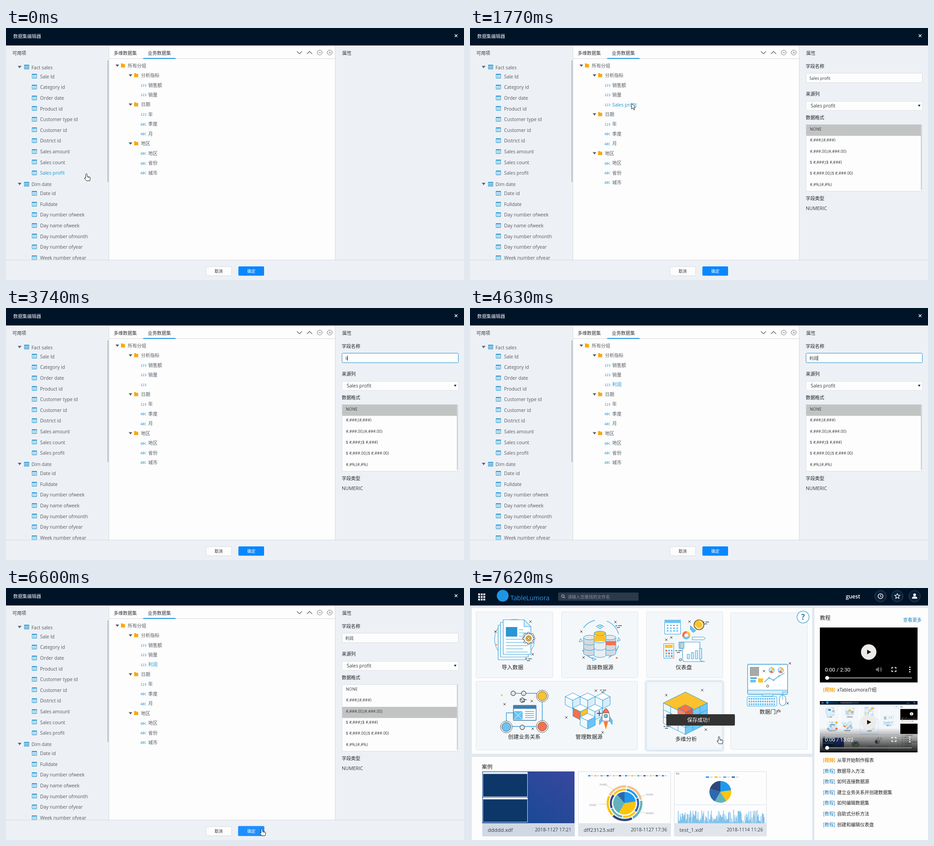
Animation of 1008x555 px, one loop 8160 ms. Source, as an HTML page with a canvas:

```html
<!DOCTYPE html>
<html lang="zh-CN">
<head>
<meta charset="utf-8">
<title>数据集编辑器</title>
<style>
html,body{margin:0;width:100%;height:100%;overflow:hidden;background:#edf1f5}
canvas{display:block}
</style>
</head>
<body>
<canvas id="stage" width="1008" height="555"></canvas>
<script>
const c = document.getElementById('stage').getContext('2d');
const LOOP = 8160, TAU = Math.PI * 2;
const NAVY = '#001428', BLUE = '#1f93d0', LINE = '#2f9fd6', GRAY = '#585c62', INK = '#1d2024', PALE = '#d9edf9',
  YELLOW = '#fcc22d', RED = '#f9704a', SKY = '#6cc3f5';
const UI = '"Open Sans","Noto Sans CJK SC","Noto Sans CJK JP",sans-serif';

// Drawing helpers
function paint(fill, stroke, lw = 1) {
  if (fill) { c.fillStyle = fill; c.fill(); }
  if (stroke) { c.strokeStyle = stroke; c.lineWidth = lw; c.stroke(); }
}
function box(x, y, w, h, fill, stroke, r = 0, lw = 1) {
  c.beginPath();
  c.roundRect(x, y, w, h, r);
  paint(fill, stroke, lw);
}
function disc(x, y, r, fill, stroke, lw) {
  c.beginPath();
  c.arc(x, y, r, 0, TAU);
  paint(fill, stroke, lw);
}
function arc(x, y, r, a, b, stroke, lw) {
  c.beginPath();
  c.arc(x, y, r, a, b);
  paint(null, stroke, lw);
}
function slice(x, y, r, a, b, fill) {
  c.beginPath();
  c.moveTo(x, y);
  c.arc(x, y, r, a, b);
  paint(fill);
}
function path(p, fill, stroke, lw) {
  c.beginPath();
  for (let i = 0; i < p.length; i += 2) c.lineTo(p[i], p[i + 1]);
  if (fill) c.closePath();
  paint(fill, stroke, lw);
}
function shape(d, x, y, fill, stroke, lw = 1) {
  const p = new Path2D(d);
  c.save();
  c.translate(x, y);
  if (fill) { c.fillStyle = fill; c.fill(p); }
  if (stroke) { c.strokeStyle = stroke; c.lineWidth = lw; c.stroke(p); }
  c.restore();
}
// y is the middle of the capitals
function text(s, x, y, color = GRAY, size = 10.4, align = 'left', weight = 400, font = UI) {
  c.font = `${weight} ${size}px ${font}`;
  c.fillStyle = color;
  c.textAlign = align;
  c.fillText(s, x, Math.round(y + size * .36));
}
function width(s, size) {
  c.font = `400 ${size}px ${UI}`;
  return c.measureText(s).width;
}

// Editor
const FACT = ['Sale Id', 'Category id', 'Order date', 'Product id', 'Customer type id', 'Customer id',
  'District id', 'Sales amount', 'Sales count', 'Sales profit'];
const DATES = ['Date id', 'Fulldate', 'Day number ofweek', 'Day name ofweek', 'Day number ofmonth',
  'Day number ofyear', 'Week number ofyear'];
const TREE = [['g', '所有分组'], ['f', '分析指标'], ['123', '销售额'], ['123', '销量'], ['f', '日期'],
  ['123', '年'], ['ABC', '季度'], ['ABC', '月'], ['f', '地区'], ['ABC', '地区'], ['ABC', '省份'], ['ABC', '城市']];
const FORMATS = ['NONE', '#,###;(#,###)', '#,###.00;(#,###.00)', '$ #,###;($ #,###)',
  '$ #,###.00;($ #,###.00)', '#,#%;(#,#%)'];
const T = { lift: 350, hover: 760, drop: 1160, pick: 1570, focus: 2400, erase: 2930, empty: 3060,
  type: 3610, commit: 4150, format: 5240, confirm: 6800, home: 7480 };

const caret = (x, y) => path([x - 4, y - 2.5, x + 4, y - 2.5, x, y + 2.5], '#565b61');

function columnIcon(x, y) {
  box(x + .5, y - 4.5, 10, 9, '#eaf4fb', BLUE);
  box(x, y - 5, 11, 2, BLUE);
  path([x + 3.8, y - 4, x + 3.8, y + 5], null, BLUE, .9);
  path([x + 7.2, y - 4, x + 7.2, y + 5], null, BLUE, .9);
}
function tableIcon(x, y) {
  columnIcon(x, y);
  path([x, y - .5, x + 11, y - .5], null, BLUE, .9);
  path([x, y + 2.2, x + 11, y + 2.2], null, BLUE, .9);
}
function source(title, y, rows, first, lit) {
  caret(30, y - 1);
  tableIcon(40, Math.round(y - .8));
  text(title, 56, y);
  rows.forEach((s, i) => {
    const ry = first + i * 23.6;
    columnIcon(57, Math.round(ry - .6));
    text(s, 75, ry, lit && s === 'Sales profit' ? BLUE : GRAY);
  });
}
function tree(t, label) {
  const rows = TREE.slice();
  if (t >= T.drop) rows.splice(4, 0, ['123', label, t >= T.pick]);
  const over = t >= T.hover && t < T.drop;
  rows.forEach(([kind, name, picked], i) => {
    const y = 83 + i * 21.45 + (over && i > 1 ? 1.5 : 0);
    if (over && i === 1) {
      box(255.5, 91.5, 468, 22, '#bfdff8');
      c.setLineDash([2, 1.5]);
      box(255.5, 91.5, 468, 22, null, '#2583c4');
      c.setLineDash([]);
    }
    if (kind === 'g' || kind === 'f') {
      const x = kind === 'g' ? 245 : 274;
      caret(x, y);
      shape('M0 0H4L5 1.5H9V9H0Z', x + 8, y - 5, '#f6ab13');
      text(name, x + 23, y, GRAY, 10.2);
    } else {
      text(kind, 296, y + .5, BLUE, 7.2, 'left', 400, '"DejaVu Sans Mono",monospace');
      text(name, 313, y, picked ? BLUE : GRAY, /[a-z]/.test(name) ? 10.4 : 10.2);
    }
  });
}
function nameAt(t) {
  if (t < T.erase) return 'Sales profit';
  if (t < T.empty) return 'Sales';
  if (t < T.type) return '';
  if (t < T.commit) return 'lirun'.slice(0, 1 + Math.floor((t - T.type) / 108));
  return '利润';
}
const caption = (s, y) => text(s, 739, y, INK, 10.2, 'left', 500);

function properties(t, name) {
  caption('字段名称', 84.8);
  const focus = t >= T.focus && t < T.format;
  box(739.5, 99.5, 256, 21, '#fdfdfd', focus ? '#2590cf' : '#d6dade', 2);
  text(name, 747, 110.5, '#33373c', 8.9);
  if (focus) box(747 + Math.round(width(name, 8.9)), 105, 1, 11, '#222');
  caption('来源列', 145.3);
  box(739.5, 161.5, 256, 20, '#fdfdfd', '#dce0e4', 2);
  text('Sales profit', 750, 171.5, '#383c41');
  path([986, 169, 991.4, 169, 988.7, 173.5], '#222');
  caption('数据格式', 197.5);
  box(739.5, 212.5, 255, 147, '#fdfdfd', '#dadee2');
  box(992, 213, 3, 143, '#d3d7da');
  box(740, 213 + (t < T.format ? 0 : 2) * 24.4, 252.5, 24.4, '#c2c3c3');
  FORMATS.forEach((s, i) => text(s, 748, 223 + i * 24.35, '#383c41', i ? 8.6 : 9.1));
  caption('字段类型', 375.8);
  text('NUMERIC', 739, 397.5, '#383c41');
}
function editor(t, p) {
  box(0, 0, 1008, 555, '#edf1f5');
  box(226, 38.4, 499, 472.6, '#d5dadf');
  box(227, 38.4, 497, 472.6, '#fdfdfd');
  box(0, 0, 1008, 38.4, NAVY);
  text('数据集编辑器', 16, 18.5, '#eef2f6', 10.2);
  path([987.5, 14, 993.5, 20], null, '#fff', 1.3);
  path([993.5, 14, 987.5, 20], null, '#fff', 1.3);
  text('可用项', 14, 55, '#33373c', 10.2);
  text('属性', 740, 55, '#33373c', 10.2);
  box(227, 67, 497, 1, '#d3d7db');
  text('多维数据集', 237, 55, '#33373c', 10.2);
  text('业务数据集', 312, 55, '#33373c', 10.2);
  box(302, 66, 71, 2, '#2496e0');
  path([640.5, 51.5, 646, 57, 651.5, 51.5], null, '#555', 1.2);
  path([662.5, 57, 668, 51.5, 673.5, 57], null, '#555', 1.2);
  disc(690.5, 54, 5.4, null, '#6a6e73');
  path([688, 54, 693, 54], null, '#6a6e73');
  disc(712.5, 54, 5.4, null, '#6a6e73');
  path([710.5, 52, 714.5, 56], null, '#6a6e73');
  path([714.5, 52, 710.5, 56], null, '#6a6e73');

  source('Fact sales', 87, FACT, 107, t < T.drop);
  source('Dim date', 344.5, DATES, 364.5);
  box(223, 71, 3, 268, '#c2c7cc', null, 1.5);

  const typed = nameAt(t);
  tree(t, t >= T.type && t < T.commit ? '' : typed);
  if (t >= T.pick) properties(t, typed);

  box(0, 511, 1008, 44, '#edf1f5');
  box(0, 510.5, 1008, 1, '#d5d9de');
  box(440.5, 525.5, 56, 20, '#fdfdfd', '#d8dbdf', 2);
  text('取消', 468, 535.5, '#33373c', 9, 'center');
  const hot = t > 6500 && t < 6900;
  if (hot) box(510.8, 524.2, 57.8, 22, '#1d90ff', null, 2);
  else box(511.5, 525, 56.5, 20.5, '#0987ff', null, 2);
  text('确定', 540, 535.5, '#fff', 9, 'center', 500);

  if (t >= T.lift && t < T.drop) {
    const dx = p.x - 115, dy = p.y - 318;
    c.globalAlpha = .55;
    box(26 + dx, 305 + dy, 197, 23, '#e8eef4');
    c.globalAlpha = .8;
    columnIcon(57 + dx, 318 + dy);
    text('Sales profit', 75 + dx, 319 + dy, BLUE);
    c.globalAlpha = 1;
  }
}
function loading(t) {
  c.globalAlpha = Math.min(1, (t - T.confirm) / 210);
  box(0, 0, 1008, 555, 'rgba(0,30,52,.5)');
  c.globalAlpha = 1;
  const shown = Math.floor((t - 6900) / 65) + 1;
  let n = 0;
  for (let row = 0; row < 5; row++) {
    const count = 3 - Math.abs(row - 2);
    for (let i = 0; i < count && n < shown; i++, n++) {
      const x = 504 + (i - (count - 1) / 2) * 13.4, y = 264.7 + row * 6.7;
      path([x, y - 5.8, x + 5.8, y, x, y + 5.8, x - 5.8, y], '#fff');
    }
  }
}

// Home page illustrations
function marks(...p) {
  for (let i = 0; i < p.length; i += 2) {
    const x = p[i], y = p[i + 1];
    path([x - 2.5, y - 2.5, x + 2.5, y + 2.5], null, '#333');
    path([x + 2.5, y - 2.5, x - 2.5, y + 2.5], null, '#333');
  }
}
function dashes(x, y) {
  path([x, y, x + 4, y], null, '#333', 1.3);
  path([x + 6, y, x + 14, y], null, '#333', 1.3);
  path([x + 3, y + 4, x + 10, y + 4], null, '#333', 1.3);
}
function cube(x, y, w, h, top, left, right) {
  const k = w / 2;
  path([x, y, x + w, y + k, x, y + w, x - w, y + k], top, LINE);
  path([x - w, y + k, x, y + w, x, y + w + h, x - w, y + k + h], left, LINE);
  path([x + w, y + k, x, y + w, x, y + w + h, x + w, y + k + h], right, LINE);
}
function drum(x, y, h, top, body) {
  c.beginPath();
  c.ellipse(x, y + h, 13, 5, 0, 0, Math.PI);
  c.lineTo(x - 13, y);
  c.lineTo(x + 13, y);
  c.closePath();
  paint(body, LINE);
  for (let i = 1; i < 3; i++) {
    c.beginPath();
    c.ellipse(x, y + h * i / 3, 13, 5, 0, 0, Math.PI);
    paint(null, LINE);
  }
  c.beginPath();
  c.ellipse(x, y, 13, 5, 0, 0, TAU);
  paint(top, LINE);
}
function documents() {
  arc(98, 113, 44, 2, 5.5, LINE);
  arc(98, 113, 44, -.2, 1.1, LINE);
  [62, 67, 73].forEach((x, i) =>
    shape('M0 0H46L61 15V76H0Z', x, 82 - i * 6, '#fff', LINE, 1.2));
  path([119, 70, 119, 85, 134, 85], PALE, LINE);
  box(79, 86, 25, 21, '#2c95d6');
  for (let i = 0; i < 8; i++) path([i < 3 ? 108 : 79, 92 + i * 7, i % 3 ? 127 : 117, 92 + i * 7], null, LINE);
  for (let i = 0; i < 8; i++) {
    const a = i * TAU / 8;
    disc(129 + 11 * Math.cos(a), 111 + 11 * Math.sin(a), 2.8, '#fff', '#444');
  }
  disc(129, 111, 10.5, '#fff', '#444');
  disc(129, 111, 6, YELLOW, '#444');
  disc(129, 111, 2.5, '#fff', '#444');
  marks(133, 74, 56, 96, 138, 146);
  dashes(122, 156);
  disc(58, 125, 1.5, RED);
}
function databases() {
  [[-2.5, -1.8], [-1.2, -.3], [.3, 1.1], [1.8, 2.6]].forEach(([a, b]) => arc(285, 114, 44, a, b, LINE, 1.3));
  path([327, 109, 331, 115, 324, 118], PALE, LINE);
  path([240, 119, 243, 111, 248, 117], PALE, LINE);
  path([270, 153, 278, 157, 270, 160], PALE, LINE);
  for (let i = 1; i < 4; i++) arc(286, 92, i * 3.5, -2.5, -.65, LINE, 1.3);
  drum(263, 109, 35, '#e6e9ed', '#d3dae1');
  drum(308, 109, 35, '#e6e9ed', '#d3dae1');
  box(295, 117, 26, 9, RED);
  drum(286, 100, 48, YELLOW, '#e9eef2');
  box(273.5, 105, 25, 12, YELLOW);
  marks(320, 75, 245, 96, 250, 153);
  dashes(320, 83);
  disc(323, 154, 2, RED);
}
function dashboard() {
  box(428.5, 70.5, 35, 31, '#fff', LINE);
  box(428, 70, 36, 7, SKY);
  for (let i = 0; i < 12; i++) box(433 + i % 4 * 7, 81 + (i >> 2) * 6, 4, 3, SKY);
  disc(504, 81, 11, YELLOW, '#444', 1.2);
  arc(504, 81, 8, -1.5, 3, '#fff', 1.5);
  slice(476, 104, 9, -1.5, .5, YELLOW);
  slice(476, 104, 9, .5, 2.6, SKY);
  slice(476, 104, 9, 2.6, 4.8, RED);
  disc(476, 104, 4, '#f4f7fa');
  path([485, 83, 497, 94, 491, 98, 485, 91], SKY, LINE);
  shape('M0 0H25L29 3L25 6H0Z', 489, 108, '#fff', LINE);
  box(426.5, 122.5, 22, 32, '#fff', LINE);
  box(429, 125, 17, 7, YELLOW);
  for (let i = 0; i < 9; i++) box(430 + i % 3 * 6, 136 + Math.floor(i / 3) * 6, 4, 4, i % 4 ? SKY : RED);
  shape('M0 0H46V38Q46 43 57 43H12Q8 43 8 38V14H0Z', 460, 119, '#fff', LINE, 1.2);
  box(462, 120, 9, 13, '#c9ced4', LINE);
  [10, 14, 18, 23].forEach((h, i) => box(478 + i * 9, 156 - h, 5, h, PALE, LINE));
  marks(483, 74, 443, 109, 432, 114);
  dashes(512, 75);
  dashes(452, 138);
  disc(463, 158, 2.5, null, '#333');
}
function portal() {
  box(611, 168, 88, 66, '#fff', LINE, 3, 1.3);
  box(611, 225, 88, 9, PALE, LINE, 2);
  disc(655, 216, 2.5, '#fff', '#444');
  for (let i = 0; i < 7; i++) {
    path([617 + i * 3, 174, 617 + i * 3, 193], null, '#444', .8);
    path([616, 175 + i * 3, 636, 175 + i * 3], null, '#444', .8);
  }
  [664, 684].forEach(x => {
    disc(x, 181, 6, PALE, LINE);
    slice(x, 181, 6, -1.5, 0, YELLOW);
    slice(x, 181, 6, 1, 2.6, RED);
  });
  box(617, 197, 14, 3, LINE);
  box(617, 202, 12, 6, SKY);
  box(634, 199, 11, 9, YELLOW);
  path([648, 207, 658, 198, 668, 203, 680, 194, 692, 187], null, LINE, 1.3);
  [[658, 198], [668, 203], [680, 194]].forEach(([x, y]) => disc(x, y, 1.6, '#fff', LINE));
  box(643, 234, 24, 4, '#fff', LINE);
  box(610, 239, 65, 21, '#fff', LINE, 2);
  for (let i = 0; i < 36; i++) box(613 + i % 12 * 5, 242 + Math.floor(i / 12) * 6, 3.5, 4, SKY);
  box(681, 236, 14, 23, '#fff', LINE, 7, 1.2);
  path([688, 237, 688, 246], null, LINE);
  path([688, 236, 688, 229, 698, 229], null, LINE);
  marks(704, 166, 647, 183, 699, 254);
}
function network() {
  path([95, 232, 159, 232, 159, 305, 80, 305, 80, 275, 95, 275], null, LINE, 1.4);
  box(95.5, 258.5, 50, 33, '#fff', '#3b6f96', 1, 1.3);
  box(95, 258, 51, 8, '#3c7fb0');
  box(97, 272, 18, 17, SKY, LINE);
  path([97, 272, 115, 289], null, '#fff');
  path([115, 272, 97, 289], null, '#fff');
  for (let i = 0; i < 4; i++) path([121, 272 + i * 4.5, 141, 272 + i * 4.5], null, LINE, 1.3);
  [[159, 238, YELLOW], [80, 306, SKY], [159, 305, RED]].forEach(([x, y, f]) => {
    disc(x, y, 13, '#fff', '#555');
    disc(x, y, 10, f, '#555');
  });
  [[95, 232], [118, 232], [115, 307], [115, 247]].forEach(([x, y]) => disc(x, y, 5, '#dfe8ef', '#555', 1.3));
  marks(136, 249, 76, 256, 138, 310);
  dashes(111, 246);
  disc(70, 236, 2, YELLOW);
}
function cubes() {
  [226, 259, 292].forEach(x => cube(x, 231, 16.5, 18, '#fff', '#eff7fc', PALE));
  cube(243, 256, 16.5, 18, '#fff', RED, YELLOW);
  cube(275, 256, 16.5, 18, '#fff', '#eff7fc', PALE);
  cube(259, 276, 16.5, 18, '#fff', '#eff7fc', SKY);
  path([279, 276, 290, 276], null, '#333', 1.5);
  path([284.5, 270, 284.5, 282], null, '#333', 1.5);
  shape('M-7 26L-14 36V26L-8 18ZM7 26L14 36V26L8 18Z', 299, 265, SKY, LINE);
  shape('M0 0Q10 8 8 28H-8Q-10 8 0 0Z', 299, 265, '#fff', '#555');
  shape('M0 0Q6 4 7 10H-7Q-6 4 0 0Z', 299, 265, RED, '#555');
  disc(299, 282, 4, SKY, '#555');
  shape('M-5 0H5L0 17Z', 299, 294, RED, YELLOW);
  marks(277, 226, 212, 285, 292, 318);
  dashes(286, 225);
}
function bigCube() {
  cube(474, 229, 48.5, 45, YELLOW, '#eef5fa', '#71c7f7');
  for (let i = 1; i < 3; i++) {
    const s = i * 16.2;
    path([474 - s, 277.5 - s / 2, 474 - s, 322 - s / 2], null, LINE);
    path([474 + s, 277.5 - s / 2, 474 + s, 322 - s / 2], null, LINE);
    path([425.5, 253 + i * 15, 474, 277.5 + i * 15, 522.5, 253 + i * 15], null, LINE);
  }
  cube(474, 257, 16.5, 16, RED, '#fa8462', '#e9593a');
  marks(511, 225, 432, 236, 519, 312);
  dashes(426, 305);
}

// Home page
function thumbnails() {
  const g = c.createLinearGradient(127, 530, 230, 404);
  g.addColorStop(0, '#174a92');
  g.addColorStop(1, '#39479f');
  box(27, 404, 203, 143, g);
  [405, 461].forEach(y => {
    box(28, y, 99, 55, '#0c3768');
    box(28.5, y + 1, 98, 3.5, '#eef3f8');
    box(28.5, y + .5, 98, 54, null, '#d3deea');
  });
  [238, 449].forEach(x => box(x + .5, 404.5, 203, 142, '#fdfdfe', '#d8dee4'));

  const tone = ['#1d9af0', '#fcc40c', '#62b3ba', '#2c68ae', '#f2c391', '#2f477c'];
  for (let i = 0; i < 13; i++) {
    box(260 + i * 13.5, 412, 5, 3, tone[i % 6], null, 1);
    box(266 + i * 13.5, 413, 5, 1, '#a8aeb4');
  }
  [[37, 5, [4, 2, 5, 1, 4]], [30, 4.5, [0, 3, 1, 2, 5, 1]]].forEach(([r, lw, ids]) =>
    ids.forEach((id, i) => arc(340, 474, r, -1.4 + i * TAU / ids.length, -1.4 + (i + .95) * TAU / ids.length, tone[id], lw)));
  [[-1.57, -.15, 0], [-.15, 2.1, 1], [2.1, 4, 2], [4, 4.72, 3]].forEach(([a, b, k]) => slice(340, 474, 25, a, b, tone[k]));
  [[300, 434, 318, 446], [284, 476, 300, 476], [386, 456, 374, 460], [390, 497, 372, 492]].forEach(p => path(p, null, '#b8c4ce', .8));
  [285, 262, 387, 388].forEach((x, i) => text('类别数据', x, [434, 479, 456, 497][i], '#98a0a8', 4));

  text('图表', 453, 410, '#777', 4);
  for (let i = 0; i < 4; i++) {
    box(519 + i * 19, 415, 7, 3, tone[i]);
    box(528 + i * 19, 416, 6, 1, '#a8aeb4');
  }
  [[-1.57, -.15, 0], [-.15, 1, 1], [1, 2.1, 2], [2.1, 3.4, 3], [3.4, 4.72, 5]].forEach(([a, b, k]) => slice(551, 449, 24, a, b, tone[k]));
  box(451, 477, 200, 1, '#d8dee4');
  let seed = 7;
  c.beginPath();
  for (let x = 457; x < 649; x += 1.4) {
    seed = (seed * 16807) % 2147483647;
    c.lineTo(x, 519 - 31 * Math.pow(seed / 2147483647, 1.1));
    c.lineTo(x + .7, 519);
  }
  paint(null, '#68b4e4', .8);

  [[27, 'ddddd.xdf', '2018-1127 17:21'], [238, 'dff23123.xdf', '2018-1127 17:36'],
    [449, 'test_1.xdf', '2018-1114 11:26']].forEach(([x, name, date]) => {
    box(x, 518, 204, 29, 'rgba(222,228,235,.93)');
    text(name, x + 12, 532.5, '#3a3e44', 11.5);
    text(date, x + 196, 532.5, '#3a3e44', 10.4, 'right');
  });
}
function player(y, h, length) {
  const b = y + h, m = b - 28.5, py = y + (h > 115 ? 54 : 46.5);
  disc(877.5, py, 17, '#ecebe9');
  path([874, py - 5, 883, py, 874, py + 5], '#111');
  text(`0:00 / ${length}`, 781, m, '#fff', 11.8, 'left', 400, 'Roboto,sans-serif');
  path([893, m - 2, 896, m - 2, 900, m - 6, 900, m + 6, 896, m + 2, 893, m + 2], '#77797b');
  arc(900, m, 3.5, -1, 1, '#77797b', 1.3);
  arc(900, m, 6, -1, 1, '#77797b', 1.3);
  for (const sx of [-1, 1]) for (const sy of [-1, 1])
    path([933 + sx * 1.5, m + sy * 4.5, 933 + sx * 4.5, m + sy * 4.5, 933 + sx * 4.5, m + sy * 1.5], null, '#fff', 1.6);
  [-5, 0, 5].forEach(d => disc(968, m + d, 1.5, '#fff'));
  box(786, b - 11.5, 187, 3, '#77797b', null, 1.5);
  disc(786, b - 10, 4.3, '#fff');
}
function tutorials(nested) {
  box(758, 44, 250, 511, '#fdfdfe');
  text('教程', 770, 66, '#222', 11.7);
  text('查看更多', 994, 70.5, '#2380bd', 10.2, 'right');
  box(770, 87, 215, 121, '#000');
  player(87, 121, '2:30');
  box(770, 249, 215, 113, '#000');
  if (!nested) {
    c.save();
    c.beginPath();
    c.rect(770, 249, 215, 113);
    c.clip();
    c.translate(770, 249);
    c.scale(.23, .2);
    home(true);
    c.restore();
    const g = c.createLinearGradient(0, 308, 0, 362);
    g.addColorStop(0, 'rgba(0,0,0,0)');
    g.addColorStop(1, 'rgba(0,0,0,.9)');
    box(770, 249, 215, 113, g);
    player(249, 113, '13:02');
  }
  [[224, 'xTableLumora介绍', 1], [379, '从零开始制作报表', 1], [403, '数据导入方法'], [426.5, '如何连接数据源'],
    [450, '建立业务关系并创建数据集'], [473.5, '如何编辑数据集'], [497, '自助式分析方法'],
    [521, '创建和编辑仪表盘']].forEach(([y, s, video]) => {
    text(video ? '[视频]' : '[教程]', 777, y, video ? '#f5a31a' : '#2380bd', 10.1, 'left', video ? 700 : 500);
    text(s, 808, y, '#222', 10.1);
  });
}
function topBar() {
  box(0, 0, 1008, 38.4, NAVY);
  for (let i = 0; i < 9; i++) box(18 + i % 3 * 5.7, 12 + Math.floor(i / 3) * 5.7, 4, 4, '#fff');
  disc(72, 17, 13, '#1e96e4');
  text('TableLumora', 89, 22, '#2c9bea', 14.2);
  box(194, 10, 177, 18, '#2b3a4a', null, 2);
  disc(204.5, 18, 2.8, null, '#a3adb7', 1.2);
  path([206.5, 20, 209, 22.5], null, '#a3adb7', 1.2);
  text('请输入您要找的文件名', 215, 19.5, '#87929e', 9.3);
  text('guest', 827, 18.5, '#fff', 12, 'left', 600);
  [903.5, 940.5, 978.5].forEach(x => disc(x, 18, 12.5, '#0a2038', '#3a5068'));
  disc(903.5, 18, 5.3, null, '#fff', 1.5);
  path([903.5, 15, 903.5, 18.5, 906, 18.5], null, '#fff', 1.2);
  const star = [];
  for (let i = 0; i <= 10; i++) {
    const r = i % 2 ? 2.8 : 6, a = i * TAU / 10 - TAU / 4;
    star.push(940.5 + r * Math.cos(a), 18 + r * Math.sin(a));
  }
  path(star, null, '#fff', 1.3);
  disc(978.5, 15, 3, '#fff');
  shape('M-6 6Q-6 1 0 1T6 6Z', 978.5, 17.5, '#fff');
}
function home(nested) {
  box(0, 0, 1008, 555, '#e1e8ee');
  topBar();
  box(4, 44, 749, 321, '#fdfdfe');
  box(4, 372, 749, 183, '#fdfdfe');
  [[13, 52, 169, 145], [201, 52, 168, 145], [388, 52, 168, 145], [573, 54, 169, 301], [13, 205, 355, 151]]
    .forEach(([x, y, w, h]) => box(x + .5, y + .5, w, h, '#f4f7fa', '#dfe5ea', 2));
  c.save();
  c.shadowColor = 'rgba(70,150,200,.35)';
  c.shadowBlur = 5;
  box(387.5, 205.5, 169, 152, '#f4f7fa', '#cfe2ee', 2);
  c.restore();
  [documents, databases, dashboard, portal, network, cubes, bigCube].forEach(f => f());
  [['导入数据', 93.5, 175], ['连接数据源', 286, 175], ['仪表盘', 470.5, 175], ['数据门户', 661, 273],
    ['创建业务关系', 119.5, 328], ['管理数据源', 262, 328], ['多维分析', 475.5, 333]]
    .forEach(([s, x, y]) => text(s, x, y, '#222', 11.9, 'center'));
  disc(733, 64, 13.2, '#fff', '#45a0cc', 1.3);
  text('?', 733, 64, '#2789bb', 17, 'center', 700);
  text('案例', 26, 394, '#222', 11.7);
  thumbnails();
  tutorials(nested);
}
function toast(t) {
  c.globalAlpha = Math.max(0, Math.min(1, (t - T.home - 20) / 110));
  box(432, 278, 151, 25, '#333', null, 2);
  text('保存成功！', 478, 291, '#fff', 11.3);
  c.globalAlpha = 1;
}

// Pointer
const MOVES = [[0, 177, 321], [70, 177, 321], [280, 115, 318], [350, 115, 318], [820, 311, 112], [1020, 317, 99],
  [1360, 317, 99], [1520, 338, 168], [1700, 338, 168], [2350, 882, 106], [4630, 857, 132], [5170, 800, 270],
  [5900, 800, 270], [6590, 563, 530], [6860, 563, 530], [7150, 548, 327.5], [LOOP, 548, 327.5]];

function pointer(t) {
  const i = MOVES.findIndex(m => m[0] > t), a = MOVES[i - 1], b = MOVES[i];
  const k = (t - a[0]) / (b[0] - a[0]), e = k * k * (3 - 2 * k);
  return { x: a[1] + (b[1] - a[1]) * e, y: a[2] + (b[2] - a[2]) * e };
}
function drawPointer(t, { x, y }) {
  if (t > T.focus && t < 4760) return;
  const dragging = t >= T.lift && t < T.drop;
  const hand = t < T.lift || t > 6500 && t < 6900 || t >= T.home;
  if (hand) {
    shape('M-1.5 1.5Q-1.5 0 0 0T1.5 1.5V6L7 7.2Q9 7.8 8.5 10L7.5 15.5H0L-4 10.5Q-4.8 8.5-2.8 8.8L-1.5 10Z', x, y, '#fff', '#222');
    shape('M3.2 6.5V9M5.5 7V9.3', x, y, null, '#222', .8);
    return;
  }
  shape('M0 0V12.5L3 9.8L5 14.5L7 13.7L5.1 9.2H9Z', x, y, '#fff', '#222');
  if (dragging) {
    c.setLineDash([1, 1]);
    box(x + 1.5, y + 10.5, 8, 5, 'rgba(255,255,255,.7)', '#222');
    c.setLineDash([]);
  }
}

function draw(now) {
  const t = now % LOOP, p = pointer(t);
  if (t < T.home) {
    editor(t, p);
    if (t >= T.confirm) loading(t);
  } else {
    home(false);
    toast(t);
  }
  drawPointer(t, p);
}
let start;
function tick(now) {
  start ??= now;
  draw(Math.max(0, now - start));
  requestAnimationFrame(tick);
}
requestAnimationFrame(tick);
</script>
</body>
</html>
```
